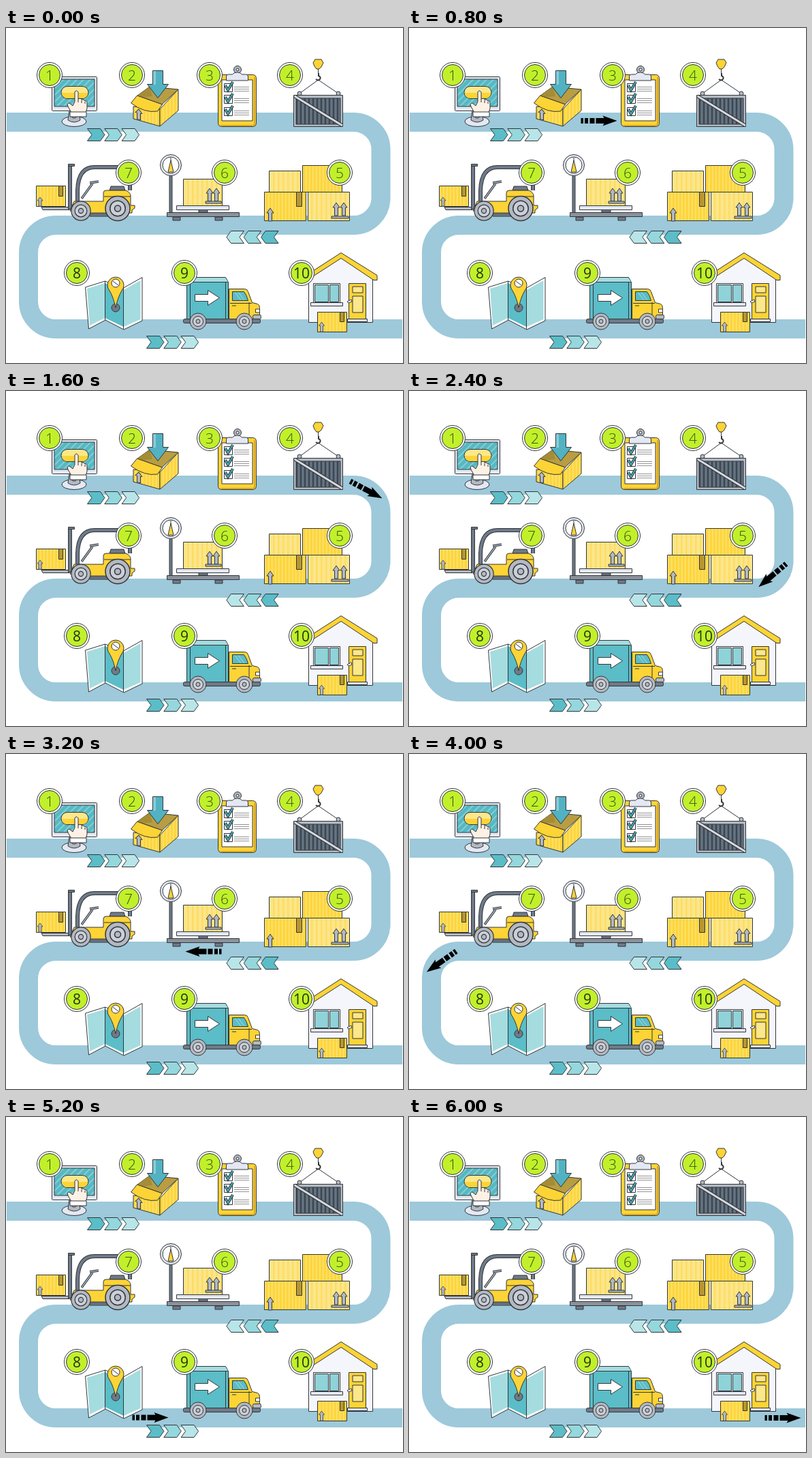
An HTML page that plays this animation: 583 by 491 pixels, repeating every 6400 ms.

```html
<!DOCTYPE html>
<html lang="en">
<head>
<meta charset="utf-8">
<title>Delivery steps</title>
<style>
html, body { margin: 0; width: 100%; height: 100%; overflow: hidden; background: #fff; }
svg { display: block; width: 583px; height: 491px; }
.o { stroke: #33363a; stroke-width: 1; stroke-linejoin: round; }
.n { fill: none; }
.y { fill: #fdd435; }
.ly { fill: #fce78a; }
.t { fill: #5bbdc7; }
.lt { fill: #a5dce0; }
.w { fill: #fff; }
.g { fill: #e4e8f3; }
.s { fill: #6f7a88; }
.m { fill: #b3b9c2; }
.k { fill: #b8962f; }
.num { font: 300 21px "Open Sans", sans-serif; text-anchor: middle; fill: #3c5212; }
.num.dark { font-weight: 400; fill: #26340c; }
.go { visibility: hidden; animation: show 6.4s step-end infinite; }
@keyframes show { 0% { visibility: visible; } 6.25%, 100% { visibility: hidden; } }
</style>
</head>
<body>
<svg viewBox="0 0 583 491">
<defs>
  <pattern id="stripeY" width="5" height="8" patternUnits="userSpaceOnUse">
    <rect width="5" height="8" fill="#fdd63e"/><rect width="1.5" height="8" fill="#fde272"/>
  </pattern>
  <pattern id="stripeL" width="7" height="8" patternUnits="userSpaceOnUse">
    <rect width="7" height="8" fill="#fce68c"/><rect width="2.5" height="8" fill="#fddd62"/>
  </pattern>
  <pattern id="glass" width="7" height="7" patternUnits="userSpaceOnUse" patternTransform="rotate(45)">
    <rect width="7" height="7" fill="#56b8c2"/><rect width="2" height="7" fill="#83cdd5"/>
  </pattern>
  <pattern id="ribs" width="6" height="8" patternUnits="userSpaceOnUse" x="426">
    <rect width="6" height="8" fill="#596775"/><rect width="2" height="8" fill="#3c4751"/>
    <rect x="3.5" width="1" height="8" fill="#748290"/>
  </pattern>
  <path id="up" d="M0 0l5 7h-2.5v12h-5v-12h-2.5z" class="o m"/>
  <path id="chev" d="M0-9h19l6.5 9-6.5 9h-19l6.5-9z" class="o"/>
  <path id="arrow" d="M-26-4h3.5v8h-3.500zM-20.500-4h5v8h-5zM-13-4h7v8h-7zM-4-4H8L6-7.500 27 0 6 7.500 8 4H-4z"/>
  <g id="wheel"><circle r="12" class="o m"/><circle r="7.5" class="o" fill="#cbd0d8"/><circle r="3" class="o m"/></g>
</defs>

<path d="M1 138H510.5A40 40 0 0 1 550.5 178V249A40 40 0 0 1 510.5 289H73A40 40 0 0 0 33 329V401A40 40 0 0 0 73 441H582" fill="none" stroke="#9dc9da" stroke-width="28"/>

<g id="monitor">
  <ellipse cx="100" cy="137" rx="18" ry="7.5" class="o g"/>
  <path d="M93 121h14l2 14q-9 6-18 0z" class="o m"/>
  <circle cx="100" cy="127" r="5" class="o m"/>
  <rect x="67.5" y="71.5" width="66" height="50" rx="1" class="o g"/>
  <rect x="71" y="75" width="59" height="40" fill="url(#glass)" class="o"/>
  <rect x="81" y="85.5" width="40" height="18" rx="9" class="o ly"/>
  <path d="M82 95a8.5 8.5 0 0 0 8 8h22q8-1 8-8z" class="y"/>
  <path d="M101 108V94q2-4 5 0v10q4-2 5 1 4-1 5 2 3-1 3 3v8l-2 6H96l-5-9q-2-5 2-5l5 4z" class="o" fill="#fdf1e5"/>
  <path d="M106 104v5M111 106v4M116 108v3" class="o n"/>
  <rect x="94" y="123" width="24" height="7" class="o w"/>
</g>

<g id="openbox">
  <path d="M193 99l18-13 42 4-24 22z" class="o" fill="#b89d42"/>
  <path d="M211 86l4 14-18 2-4-3z" fill="#a58c36"/>
  <path d="M215.5 62.5h15v20h8l-15.5 20-15.5-20h8z" class="o" fill="#52b2c2"/>
  <path d="M216 63h4v20h-4z" fill="#83cdd8"/>
  <path d="M187 115l39 4v25l-39-11z" fill="url(#stripeY)" class="o"/>
  <path d="M226 119l27-29v31l-27 23z" fill="url(#stripeY)" class="o"/>
  <path d="M183.5 110l9-11 37 13-7 10q-19 3-39-12z" class="o y"/>
  <use href="#up" transform="translate(195 119)skewY(12)scale(1 .8)"/>
</g>

<g id="clipboard">
  <rect x="311.5" y="68.5" width="56" height="76" rx="5" class="o y"/>
  <path d="M365 72v68q0 3-4 3H315" fill="none" stroke="#d9a824" stroke-width="2"/>
  <rect x="317" y="76" width="45" height="60" class="o w"/>
  <circle cx="340" cy="61" r="5.5" class="o m"/><circle cx="340" cy="61" r="2" class="o w"/>
  <path d="M323.5 77v-6q0-3 3-3h6q2-3 7-3t7 3h6q3 0 3 3v6z" class="o g"/>
  <g id="task">
    <rect x="320.5" y="81.5" width="12" height="12" class="o w"/>
    <path d="M322 84l4 7 7-12" fill="none" stroke="#33363a" stroke-width="4"/>
    <path d="M322 84l4 7 7-12" fill="none" stroke="#46aab6" stroke-width="2"/>
    <path d="M335 86.500h22M335 89.500h22M335 92.500h22" class="n" stroke="#777" stroke-width=".8"/>
  </g>
  <use href="#task" y="17"/><use href="#task" y="35"/>
</g>

<g id="container">
  <path d="M458.5 60v9m0 7L431 96m27.5-20L488 96" class="o n"/>
  <path d="M454 46h9l3 5-3 6-3 3h-4l-3-4-2-5z" class="o y"/>
  <path d="M459 66v4q4 2 2 5t-6 0" fill="none" stroke="#33363a" stroke-width="2"/>
  <circle cx="431" cy="96" r="3" class="o m"/><circle cx="488" cy="96" r="3" class="o m"/>
  <rect x="422.5" y="98.5" width="72" height="46" class="o m"/>
  <rect x="426" y="103" width="65" height="38" fill="url(#ribs)" class="o"/>
  <path d="M424 100l70 43" stroke="#33363a" stroke-width="5"/><path d="M424 100l70 43" stroke="#d5d9df" stroke-width="3"/>
</g>

<g id="stack">
  <rect x="386.5" y="209.5" width="46" height="31" fill="url(#stripeL)" class="o"/>
  <rect x="435.5" y="201.5" width="58" height="39" fill="url(#stripeY)" class="o"/>
  <rect x="379.5" y="240.5" width="61" height="42" fill="url(#stripeY)" class="o"/>
  <rect x="443.5" y="240.5" width="61" height="42" fill="url(#stripeL)" class="o"/>
  <rect x="426.5" y="240.5" width="8" height="21" class="o k"/>
  <use href="#up" x="388" y="264"/>
  <use href="#up" x="485" y="256"/><use href="#up" x="496" y="256"/>
  <rect x="478" y="276" width="25" height="3" class="o m"/>
</g>

<g id="scale">
  <rect x="240" y="215" width="4" height="56" class="o s"/>
  <circle cx="242" cy="201" r="15.5" class="o g"/><circle cx="242" cy="201" r="12" class="o w"/>
  <path d="M242 194l4 17h-8z" class="o y"/>
  <path d="M242 190v5" class="o"/>
  <path d="M245 277h11v5h-11zM307 277h11v5h-11z" class="o s"/>
  <rect x="236.5" y="270.5" width="106" height="6" class="o" fill="#8b929c"/>
  <path d="M283 266h13v4h-13z" class="o s"/>
  <rect x="250.5" y="260.5" width="77" height="6" class="o g"/>
  <rect x="260.5" y="221.5" width="57" height="39" fill="url(#stripeL)" class="o"/>
  <use href="#up" x="299" y="235"/><use href="#up" x="309" y="235"/>
  <rect x="293" y="254" width="23" height="3" class="o m"/>
</g>

<g id="forklift">
  <rect x="44.5" y="231.5" width="43" height="30" fill="url(#stripeY)" class="o"/>
  <rect x="77.5" y="231.5" width="6" height="15" class="o k"/>
  <use href="#up" transform="translate(50 248)scale(.8 .7)"/>
  <path d="M52 262.5h41v4H54z" class="o m"/>
  <path d="M105 256V238q1-34 25-34h52v34" fill="none" stroke="#30353c" stroke-width="6"/>
  <path d="M105 256V238q1-34 25-34h52v34" fill="none" stroke="#6f7a88" stroke-width="4"/>
  <path d="M111 250l16-22M123 227l13-2" stroke="#30353c" stroke-width="3.5"/>
  <path d="M111 250l16-22M123 227l13-2" stroke="#a8afb8" stroke-width="1.5"/>
  <rect x="91.5" y="200.5" width="5" height="65" class="o s"/><rect x="91.5" y="199.5" width="9" height="3" class="o s"/>
  <path d="M152 238l2-6h19l2 6z" class="o s"/>
  <path d="M94 268l6-14h43v-12q0-4 4-4h29q7 3 7 8v14h6v4l-4 3v4H124z" class="o y"/>
  <path d="M144 247h39" class="o"/>
  <path d="M122 272h30v4h-29z" class="o s"/>
  <use href="#wheel" transform="translate(110 268)scale(1.18)"/>
  <use href="#wheel" transform="translate(164 264.5)scale(1.5)"/>
</g>

<g id="map">
  <path d="M116.5 380l29-9 27 10 27.500-15.500v63.500l-27 13-27-14-24.500 13z" class="o w"/>
  <path d="M119 382l26-8v51l-22 11z" class="lt"/>
  <path d="M145.5 374l27 10v54l-27-13z" class="t"/>
  <path d="M172.5 384l25-14v57l-25 11z" class="lt"/>
  <path d="M145.5 371v57M172.5 381v60" class="o"/>
  <circle cx="161" cy="410" r="6" class="o s"/>
  <path d="M161 410q-3-15-9-25a12 12 0 1 1 18 0q-6 10-9 25z" class="o y"/>
  <circle cx="161" cy="374" r="6" class="o w"/><path d="M157 371l8 6" class="o"/>
</g>

<g id="truck">
  <rect x="260.5" y="426.5" width="113" height="6" rx="2" class="o s"/>
  <path d="M265.5 365.5h57l4 7v54h-61z" class="o t"/>
  <path d="M266 366h56l4 6h-60z" class="lt"/>
  <path d="M266 372.5h60M270.5 373v53M322.5 373v53" class="o"/>
  <path d="M277.5 390.5h19v-6l17 11-17 11v-6h-19z" class="o w"/>
  <path d="M327.5 382.5h23q4 0 5 4l6 16 8 2q3 1 3 6v16h-45z" class="o y"/>
  <path d="M332.5 386.5h17q4 5 6 13h-23z" class="o t"/>
  <path d="M336 387l9 12M341 387l9 12" stroke="#a5dce0"/>
  <path d="M329 403.5h32M332 407h6M357 402v22" class="o"/>
  <rect x="366.5" y="412" width="6" height="5" class="o w"/>
  <rect x="362.5" y="420.5" width="12" height="6" rx="2" class="o m"/>
  <use href="#wheel" x="282" y="430"/><use href="#wheel" x="350" y="430"/>
</g>

<g id="house">
  <path d="M444.5 365l48-31 46 32v65.5h-94z" class="o" fill="#f4f6fb"/>
  <path d="M440 363l52-33.5 53 33v7h-5L492 337.5 440 371z" class="o y"/>
  <rect x="451.5" y="374.5" width="39" height="29" class="o w"/>
  <path d="M453.5 376.5h20v25h-20zM475.5 376.5h13v25h-13z" class="o" fill="#8fd2d8"/>
  <rect x="447.5" y="402.5" width="47" height="5" class="o g"/>
  <rect x="503.5" y="374.5" width="25" height="52" class="o y"/>
  <path d="M509 379h15v9h-15zM509 393h15v24h-15z" class="o ly"/>
  <path d="M501 401l6-3 1 3-5 2z" class="o w"/>
  <path d="M501.5 426.5h29v4h-29z" class="o g"/>
  <rect x="457.5" y="416.5" width="43" height="29" fill="url(#stripeY)" class="o"/>
  <rect x="490.5" y="416.5" width="6" height="14" class="o k"/>
  <use href="#up" transform="translate(463.5 431)scale(.8 .75)"/>
</g>

<g id="chevrons"></g>
<g id="badges"></g>
<g id="arrows"></g>
</svg>
<script>
const add = (id, html) => { document.getElementById(id).innerHTML += html; };

const badges = [[64, 69], [185, 69], [299, 69], [417, 69], [490, 212],
  [321, 212], [180, 212], [104, 359], [262, 359], [434, 359]];
badges.forEach(([x, y], i) => add('badges', `<g transform="translate(${x} ${y})">
  <circle r="18.5" class="o w"/><circle r="15.5" class="o" fill="#c1f02b"/>
  <text y="7.5" class="num${i > 6 ? ' dark' : ''}">${i + 1}</text></g>`));

// x, y and direction of each row of three, darkest first
const tints = ['#5bbdc7', '#94d7dc', '#b8e5e8'];
[[119.5, 156.5, 1], [400, 306.5, -1], [206.5, 460.5, 1]].forEach(([x, y, dir]) =>
  tints.forEach((fill, i) => add('chevrons',
    `<use href="#chev" fill="${fill}" transform="translate(${x + dir * 25.3 * i} ${y})scale(${dir} 1)"/>`)));

// x, y and heading of the black arrow at each step
const stops = [
  [157, 136, 0], [278.5, 136, 0], [395, 136, 0], [528.5, 144.5, 28],
  [550, 213, 90], [534, 270, 140], [410, 289.5, 180], [290.5, 289.5, 180],
  [168, 289.5, 180], [48, 304, 145], [34, 365, 90], [58, 424, 40],
  [211.5, 440.5, 0], [404, 440.5, 0], [548.5, 441, 0]];
const beat = 400, loop = 6400;
stops.forEach(([x, y, turn], i) => add('arrows',
  `<use href="#arrow" class="go" style="animation-delay:${(i + 1) * beat - loop}ms" transform="translate(${x} ${y})rotate(${turn})"/>`));
</script>
</body>
</html>
```
